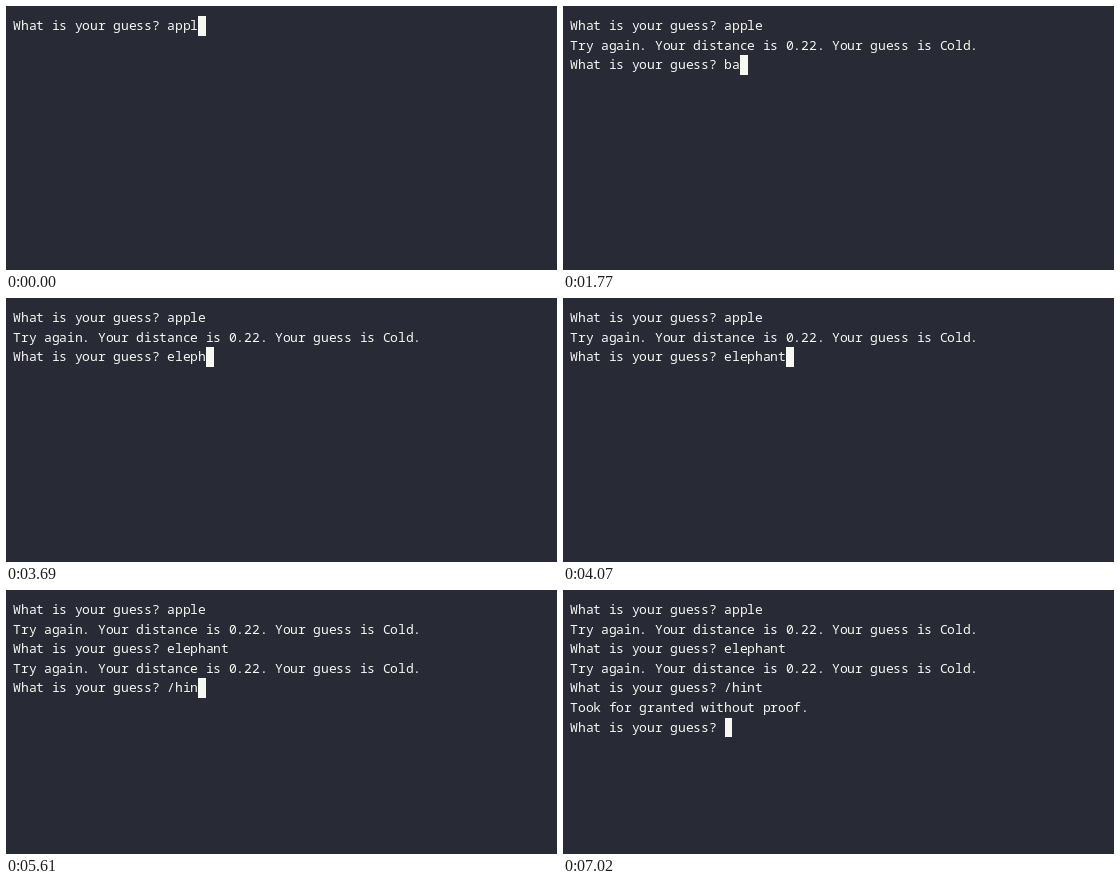
These frames come from a looping animation (551x264 px, 8000 ms). An HTML page:

```html
<!DOCTYPE html>
<html lang="en">
<head>
<meta charset="utf-8">
<title>Word guessing game</title>
<style>
  html, body { margin: 0; width: 100%; height: 100%; overflow: hidden; background: #282a36; }
  svg { display: block; width: 551px; height: 264px; fill: #f8f8f2; }
  text { font: 13px "Noto Sans Mono", "DejaVu Sans Mono", monospace; white-space: pre; }
</style>
</head>
<body>
<svg id="terminal" viewBox="0 0 551 264"></svg>
<script>
  const LOOP = 8000, CELL = 7.697, ROW = 19.6, TOP = 10, ASCENT = 14;
  const PROMPT = "What is your guess? ";
  const COLD = "Try again. Your distance is 0.22. Your guess is Cold.\n" + PROMPT;

  // Terminal output by time in ms; "\b" erases one character.
  const output = [
    [0, PROMPT + "appl"], [120, "e"], [350, "\n"], [960, COLD],
    [1640, "b"], [1770, "a"], [2570, "\b"], [2730, "\b"],
    [3280, "e"], [3320, "l"], [3460, "e"], [3590, "p"], [3690, "h"],
    [3840, "a"], [3950, "n"], [4070, "t"], [4290, "\n"], [4560, COLD],
    [5090, "/"], [5450, "h"], [5530, "i"], [5610, "n"], [5660, "t"], [6000, "\n"],
    [7020, "Took for granted without proof.\n" + PROMPT]
  ];

  // The grid has a one-cell left margin and rows on whole pixels.
  const columnX = column => CELL * (column + 1);
  const rowY = row => Math.round(TOP + ROW * row);

  const svg = document.getElementById("terminal");
  function add(tag) {
    return svg.appendChild(document.createElementNS("http://www.w3.org/2000/svg", tag));
  }
  function setAttributes(node, attributes) {
    for (const name in attributes) node.setAttribute(name, attributes[name]);
  }

  const lines = Array.from({ length: 7 }, () => add("text"));
  const cursor = add("rect");

  function screenAt(time) {
    let screen = "";
    for (const [start, chunk] of output) {
      if (start > time) break;
      screen = chunk === "\b" ? screen.slice(0, -1) : screen + chunk;
    }
    return screen;
  }

  function drawLine(line, row, content) {
    const glyphX = Array.from(content, (_, column) => Math.floor(columnX(column)));
    setAttributes(line, { x: glyphX.join(" "), y: rowY(row) + ASCENT });
    line.textContent = content;
  }

  function drawCursor(column, row) {
    const x = Math.round(columnX(column)), y = rowY(row);
    setAttributes(cursor, {
      x, y, width: Math.round(columnX(column + 1)) - x, height: rowY(row + 1) - y
    });
  }

  let shown = null;
  function draw(now) {
    const screen = screenAt(now % LOOP);
    if (screen !== shown) {
      shown = screen;
      const rows = screen.split("\n");
      const last = rows.length - 1;
      lines.forEach((line, row) => drawLine(line, row, rows[row] || ""));
      drawCursor(rows[last].length, last);
    }
    requestAnimationFrame(draw);
  }
  draw(performance.now());
</script>
</body>
</html>
```
